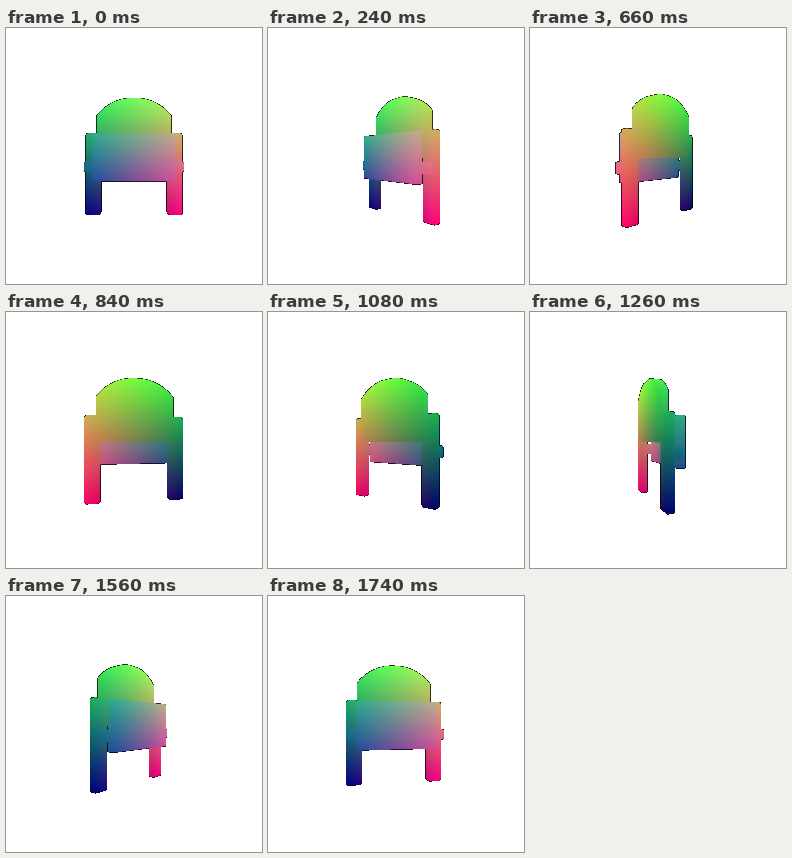
Recreate the animation shown at these times as an HTML page with a canvas. Size 256x256 px, loop 1.8 s.

```html
<!DOCTYPE html>
<html lang="en">
<head>
<meta charset="utf-8">
<title>Turning chair</title>
<style>
  html, body { margin: 0; width: 100%; height: 100%; overflow: hidden; background: #fff; }
  canvas { display: block; width: 100vw; height: 100vh; image-rendering: pixelated; }
</style>
</head>
<body>
<canvas id="stage" width="256" height="256"></canvas>
<script>
const SIZE = 256, STEP_MS = 60, STEPS = 30;
const EYE = 240, CENTER_X = 128, CENTER_Y = 128;
const VIEW = { left: 74, right: 183, top: 62, bottom: 207 };
const SAMPLES = [0.25, 0.75];

const ctx = document.getElementById('stage').getContext('2d');
const image = ctx.createImageData(SIZE, SIZE);

// A bevelled box, stored as slabs [normal x, y, z, low, high]; y points down.
function box(x0, x1, y0, y1, z0, z1, bevel) {
  const mid = [(x0 + x1) / 2, (y0 + y1) / 2, (z0 + z1) / 2];
  const half = [(x1 - x0) / 2, (y1 - y0) / 2, (z1 - z0) / 2];
  const slabs = [];
  const add = (normal, reach) => {
    const offset = normal.reduce((sum, n, i) => sum + n * mid[i], 0);
    slabs.push([...normal, offset - reach, offset + reach]);
  };
  for (let a = 0; a < 3; a++) {
    const axis = [0, 0, 0];
    axis[a] = 1;
    add(axis, half[a]);
    for (let b = a + 1; bevel && b < 3; b++) {
      for (const sign of [1, -1]) {
        const diagonal = [0, 0, 0];
        diagonal[a] = 1;
        diagonal[b] = sign;
        add(diagonal, half[a] + half[b] - bevel);
      }
    }
  }
  return { slabs };
}

const back = box(-38, 38, -59.2, 2, -12, -2.5, 1.5);
back.arc = { radius: 48.3, y: -10.9 };

const solids = [back, box(-39.7, 39.7, -21.5, 24.4, 4, 12.2, 1)];
for (const side of [-1, 1]) {
  const [x0, x1] = side < 0 ? [-49, -33.7] : [33.7, 49];
  solids.push(box(x0, x1, -23.2, 59.8, -9.4, -0.7, 2));
  solids.push(box(x0, x1, 5, 16, -2, 7.5, 2));
}

// Distance along the ray to the solid, or Infinity.
function hit(solid, ox, oz, dx, dy, dz) {
  let near = 0, far = Infinity;
  for (const [nx, ny, nz, low, high] of solid.slabs) {
    const o = nx * ox + nz * oz;
    const d = (nx * dx + ny * dy + nz * dz) || 1e-9;
    const a = (low - o) / d, b = (high - o) / d;
    near = Math.max(near, Math.min(a, b));
    far = Math.min(far, Math.max(a, b));
    if (near > far) return Infinity;
  }
  if (solid.arc) {
    const { radius, y } = solid.arc;
    const a = dx * dx + dy * dy || 1e-9;
    const b = ox * dx - y * dy;
    const root = b * b - a * (ox * ox + y * y - radius * radius);
    if (root < 0) return Infinity;
    near = Math.max(near, (-b - Math.sqrt(root)) / a);
    far = Math.min(far, (-b + Math.sqrt(root)) / a);
  }
  return near <= far ? near : Infinity;
}

const clamp = v => Math.max(0, Math.min(1, v));

function tint(x, y, z) {
  const green = clamp(0.5 - y / 120);
  const red = clamp(0.5 - 0.05 * green + x / 98 * (1 - 0.42 * green));
  const blue = clamp(0.5 - 0.12 * green + z / 90);
  return [red, green, blue];
}

function draw(angle) {
  const c = Math.cos(angle), s = Math.sin(angle);
  const ox = EYE * s, oz = EYE * c;
  image.data.fill(255);
  for (let py = VIEW.top; py < VIEW.bottom; py++) {
    for (let px = VIEW.left; px < VIEW.right; px++) {
      const sum = [0, 0, 0];
      let covered = 0;
      for (const sy of SAMPLES) for (const sx of SAMPLES) {
        const u = px + sx - CENTER_X, v = py + sy - CENTER_Y;
        const dx = u * c - EYE * s, dz = -u * s - EYE * c;
        let t = Infinity;
        for (const solid of solids) t = Math.min(t, hit(solid, ox, oz, dx, v, dz));
        if (t === Infinity) continue;
        covered++;
        tint(ox + t * dx, t * v, oz + t * dz).forEach((value, i) => sum[i] += value);
      }
      if (!covered) continue;
      // Partly covered pixels darken into a thin black rim.
      const share = covered / 4, gain = 255 * share * share / covered;
      const at = (py * SIZE + px) * 4;
      for (let i = 0; i < 3; i++) image.data[at + i] = sum[i] * gain;
    }
  }
  ctx.putImageData(image, 0, 0);
}

let start = null, shown = -1;
function tick(now) {
  if (start === null) start = now;
  const step = Math.floor((now - start) / STEP_MS) % STEPS;
  if (step !== shown) {
    shown = step;
    draw(step / STEPS * 2 * Math.PI);
  }
  requestAnimationFrame(tick);
}
draw(0);
requestAnimationFrame(tick);
</script>
</body>
</html>
```
